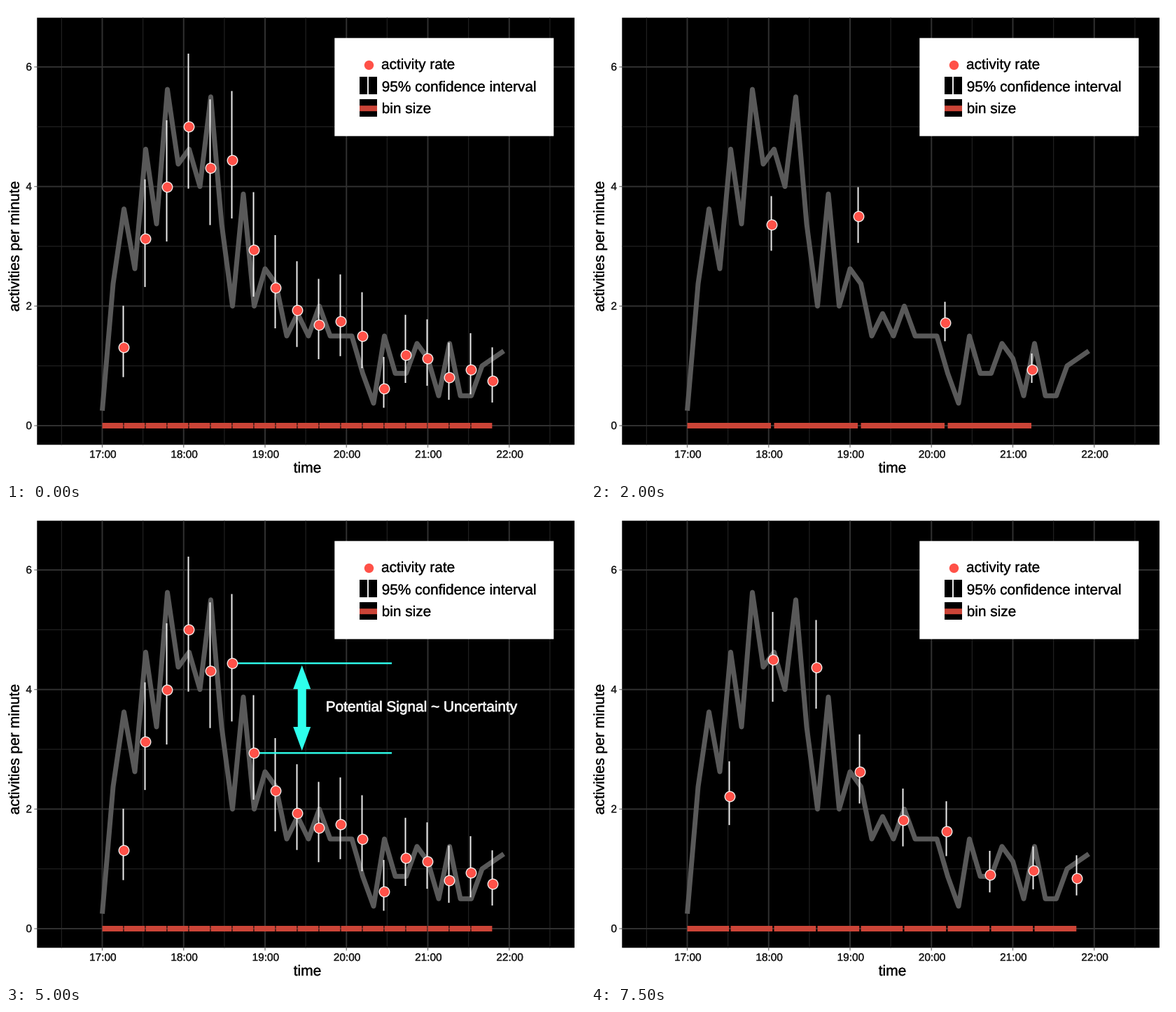
A matplotlib script that plays this animation: 827x678 px, repeating every 8 s.

```python
import numpy as np
import matplotlib.pyplot as plt
from matplotlib.animation import FuncAnimation
from matplotlib.collections import LineCollection
from matplotlib.patches import Polygon, Rectangle
from matplotlib.patheffects import withStroke

plt.rcParams["font.family"] = "Liberation Sans"
plt.rcParams["text.hinting"] = "none"
plt.rcParams["path.snap"] = False

W, H, DPI = 827, 678, 72  # at 72 dpi one point is one pixel
LEFT, RIGHT, TOP, BOTTOM = 44.3, 812, 16.7, 626.3
HOUR, UNIT = 116.25, 85.33
STEP = HOUR * 8 / 60  # the series is sampled every 8 minutes
RED, BAR, CYAN = "#ff5148", "#cb4437", "#2effec"
MAJOR, MINOR, GREY, INK = "#303030", "#212121", "#595959", "#080808"

# events per 8-minute slot
COUNTS = np.array([2, 19, 29, 21, 37, 27, 45, 35, 37, 32, 44, 27, 16,
                   31, 16, 21, 19, 12, 15, 12, 16, 12, 12, 12, 7, 3,
                   12, 7, 7, 11, 9, 4, 11, 4, 4, 8, 9, 10])

# slots per bin for each half second, and when the annotation shows
SCHEDULE = [2] * 2 + [4] * 2 + [8] * 2 + [16] * 2 + [2] * 6 + [4] * 2
NOTE_FRAMES = range(10, 14)


def px(hour):
    return 137.5 + (hour - 17) * HOUR


def py(rate):
    return 599 - rate * UNIT


def poisson_interval(n, z=1.96):
    """Approximate 95% limits of a Poisson count."""
    m = n + 1
    low = n * (1 - 1 / (9 * n) - z / (3 * np.sqrt(n))) ** 3
    high = m * (1 - 1 / (9 * m) + z / (3 * np.sqrt(m))) ** 3
    return low, high


def binned(slots):
    """Marker positions, interval segments and bin segments."""
    bins = (len(COUNTS) - 1) // slots
    n = COUNTS[:bins * slots].reshape(bins, slots).sum(axis=1)
    minutes = 8 * slots
    width = slots * STEP
    start = px(17) + np.arange(bins) * width
    x = start + width * 0.968
    low, high = (py(v / minutes) for v in poisson_interval(n))
    intervals = [[(a, b), (a, c)] for a, b, c in zip(x, low, high)]
    bars = [[(a, 599), (a + width * 0.964, 599)] for a in start]
    return x, py(n / minutes), intervals, bars


fig = plt.figure(figsize=((W + 0.01) / DPI, (H + 0.01) / DPI), dpi=DPI,
                 facecolor="white")
ax = fig.add_axes([0, 0, 1, 1])
ax.set_xlim(0, W)
ax.set_ylim(H, 0)
ax.axis("off")


def line(xs, ys, color, width, z=1, **kw):
    kw.setdefault("solid_capstyle", "butt")
    return ax.plot(xs, ys, color=color, lw=width, zorder=z, **kw)[0]


def box(x0, y0, x1, y1, color, z):
    ax.add_patch(Rectangle((x0, y0), x1 - x0, y1 - y0, color=color, lw=0,
                           zorder=z))


def label(x, y, text, size=20.8, color=INK, weight=0.25, **kw):
    """Text thickened by a thin stroke of its own colour."""
    kw.setdefault("va", "baseline")
    effect = withStroke(linewidth=weight, foreground=color)
    return ax.text(x, y, text, fontsize=size, color=color, zorder=12,
                   path_effects=[effect], **kw)


# panel, grid and axes
box(LEFT, TOP, RIGHT, BOTTOM, "black", 0)
for hour in np.arange(16.5, 23, 1):
    line([px(hour)] * 2, [TOP, BOTTOM], MINOR, 1.2)
for rate in (1, 3, 5):
    line([LEFT, RIGHT], [py(rate)] * 2, MINOR, 1.2)
for hour in range(17, 23):
    line([px(hour)] * 2, [TOP, BOTTOM], MAJOR, 2)
    line([px(hour)] * 2, [BOTTOM, BOTTOM + 4], "#777777", 1.2)
    label(px(hour) + 0.8, 645, f"{hour}:00", 15.4, "#1c1c1c", ha="center")
for rate in (0, 2, 4, 6):
    line([LEFT, RIGHT], [py(rate)] * 2, MAJOR, 2)
    line([LEFT - 4, LEFT], [py(rate)] * 2, "#777777", 1.2)
    label(37, py(rate) + 5, str(rate), 15.4, "#1c1c1c", ha="right")
label(430.5, 666, "time", 21, ha="center")
label(13.3, 343, "activities per minute", 21.1, rotation=90, ha="center",
      va="center")

line(px(17) + np.arange(len(COUNTS)) * STEP, py(COUNTS / 8), GREY, 7, 3,
     solid_joinstyle="round")

# legend
box(469.3, 45.7, 782.3, 185.7, "white", 10)
ax.plot(517.5, 84, "o", ms=13.4, color=RED, mew=0, zorder=12)
box(505, 101, 530, 126, "black", 11)
line([517, 517], [101, 126], "#eeeeee", 2, 12)
box(505, 133, 530, 158, "black", 11)
line([505, 530], [146.2, 146.2], BAR, 8, 12)
label(536, 90, "activity rate")
label(536.7, 122, "95% confidence interval")
label(536.7, 153, "bin size")

# annotation
arrow = [(0, 223), (12.5, 257), (6, 257), (6, 311), (12.5, 311), (0, 345),
         (-12.5, 311), (-6, 311), (-6, 257), (-12.5, 257)]
note = [
    line([326, 551], [220.2, 220.2], CYAN, 2.4, 6),
    line([357, 551], [348.3, 348.3], CYAN, 2.4, 6),
    ax.add_patch(Polygon([(422.7 + dx, y) for dx, y in arrow], color=CYAN,
                         lw=0, zorder=6)),
    label(456.7, 289, "Potential Signal ~ Uncertainty", 20.8, "#eeeeee", 0.7),
]

# bins, intervals and rates
bin_bars = LineCollection([], colors=BAR, linewidths=8, zorder=4,
                          capstyle="butt")
interval_lines = LineCollection([], colors="#ececec", linewidths=2, zorder=5,
                                capstyle="butt")
ax.add_collection(bin_bars, autolim=False)
ax.add_collection(interval_lines, autolim=False)
rates, = ax.plot([], [], "o", ms=14.6, color=RED, mec="#fff4f2", mew=1.3,
                 zorder=8)


def update(frame):
    x, y, intervals, bars = binned(SCHEDULE[frame])
    rates.set_data(x, y)
    interval_lines.set_segments(intervals)
    bin_bars.set_segments(bars)
    for artist in note:
        artist.set_visible(frame in NOTE_FRAMES)
    return [bin_bars, interval_lines, rates, *note]


anim = FuncAnimation(fig, update, frames=len(SCHEDULE), interval=500,
                     repeat=True, repeat_delay=0, blit=False)
plt.show()
```
